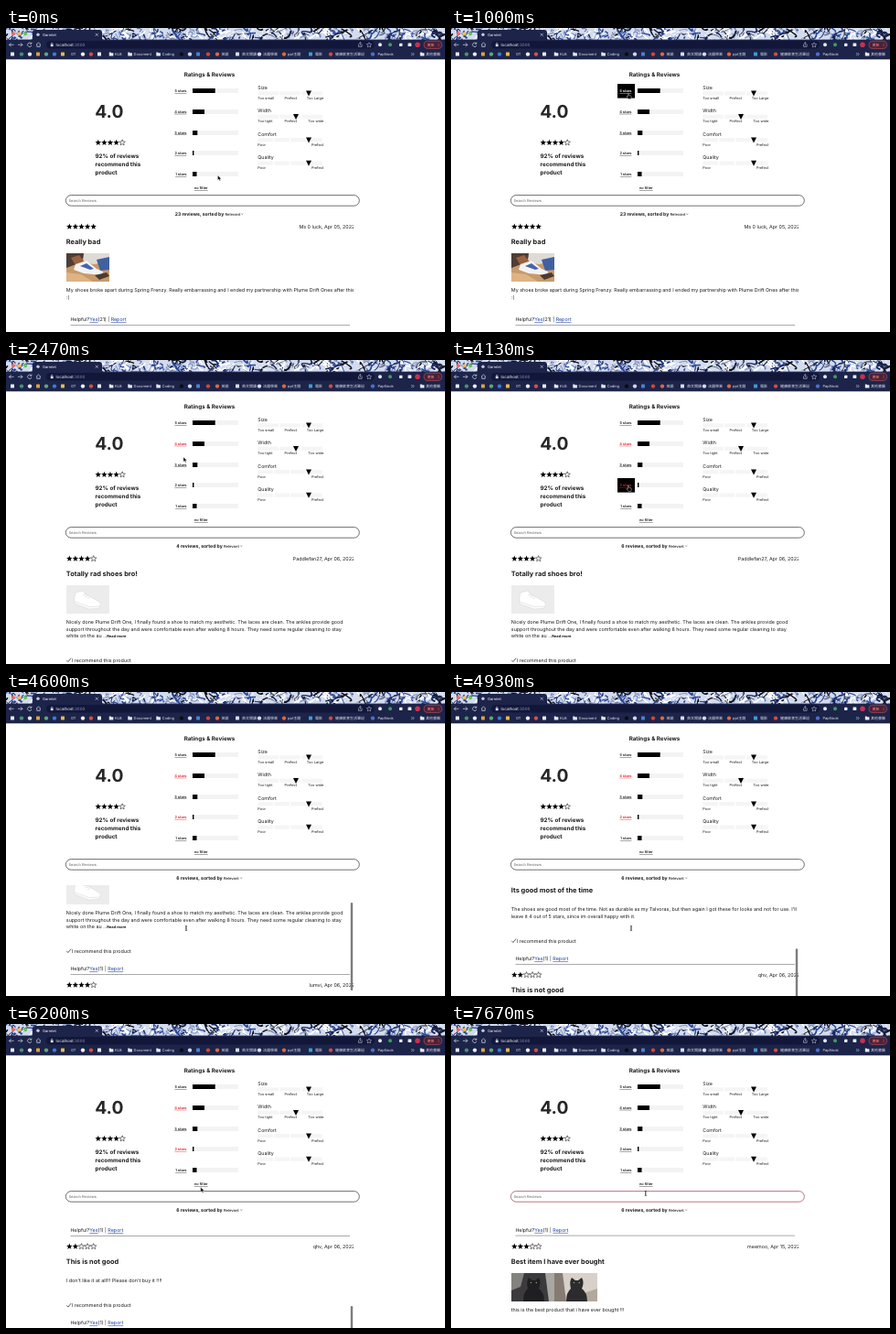
Write an HTML page that moves like this. It is 480 px wide and 332 px high and loops after 8000 ms.

```html
<!DOCTYPE html>
<html lang="en">
<head>
<meta charset="utf-8">
<title>Reviews</title>
<style>
html, body { margin: 0; width: 100%; height: 100%; overflow: hidden; background: #fff; }
svg { display: block; width: 100vw; height: 100vh; }
text { font-family: Inter, "Noto Sans CJK TC", "Noto Sans CJK", sans-serif; text-rendering: geometricPrecision; white-space: pre; }
.u { text-decoration: underline; text-decoration-thickness: .5px; }
.link { fill: #1b3fa0; text-decoration: underline; text-decoration-thickness: .45px; }
</style>
</head>
<body>
<svg id="stage" viewBox="0 0 480 332" xmlns="http://www.w3.org/2000/svg"></svg>
<script>
const NAVY = '#1d2449', INK = '#1c1c1c', BODY = 5.36;
const ROWS = [68.7, 91.4, 114.1, 136.8, 159.6];

// drawing helpers, y of text is its visual middle
const text = (x, y, s, size, o = {}) =>
  `<text x="${x}" y="${y + size * .36}" font-size="${size}" font-weight="${o.w || 400}" fill="${o.c || INK}"` +
  ` text-anchor="${o.a || 'start'}" class="${o.k || ''}" id="${o.id || ''}">${s}</text>`;
const rect = (x, y, w, h, c, extra = '') =>
  `<rect x="${x}" y="${y}" width="${w}" height="${h}" fill="${c}" ${extra}/>`;
const dot = (x, y, r, c) => `<circle cx="${x}" cy="${y}" r="${r}" fill="${c}"/>`;
const path = (d, c, w = 0, extra = '') =>
  `<path d="${d}" ${w ? `fill="none" stroke="${c}" stroke-width="${w}"` : `fill="${c}"`} ${extra}/>`;
const group = (id, s) => `<g id="${id}">${s}</g>`;

function stars(x, y, n) {
  let out = '';
  for (let i = 0; i < 5; i++) {
    const pts = [];
    for (let k = 0; k < 10; k++) {
      const r = k % 2 ? 1.45 : 3.4, a = k * Math.PI / 5;
      pts.push((x + 3.3 + i * 6.6 + r * Math.sin(a)).toFixed(2) + ' ' + (y - r * Math.cos(a)).toFixed(2));
    }
    const d = 'M' + pts.join('L') + 'Z';
    out += i < n ? path(d, '#000') : path(d, '#000', .5);
  }
  return out;
}

function rng(seed) {
  return () => (seed = (seed * 16807) % 2147483647) / 2147483647;
}

function splatter() {
  const rnd = rng(77), tones = ['#10131f', '#10131f', '#2a4796', '#2a4796', '#16265e', '#ffffff', '#ffffff', '#ffffff', '#8c9bc4'];
  let out = rect(0, 0, 480, 13, '#d3dbee');
  for (let i = 0; i < 380; i++) {
    const x = rnd() * 480, y = rnd() * 13, c = tones[Math.floor(rnd() * tones.length)];
    const p = () => `${((rnd() - .5) * 20).toFixed(1)} ${((rnd() - .5) * 18).toFixed(1)}`;
    out += path(`M${x.toFixed(1)} ${y.toFixed(1)}q${p()} ${p()}`, c, (.5 + rnd() * 1.4).toFixed(2));
  }
  return out;
}

function browser() {
  const lt = '#e6e9f5', small = { c: lt };
  let s = `<g clip-path="url(#strip)">${splatter()}</g>`;
  s += dot(8, 6.3, 2, '#ee6a5f') + dot(14.6, 6.3, 2, '#f5bd4f') + dot(21.2, 6.3, 2, '#61c454');
  s += path('M27 13q2 0 2-2v-6q0-3 3-3h70q3 0 3 3v6q0 2 2 2z', NAVY);
  s += dot(35, 7.3, 1.7, '#c3c9dc') + text(40, 7.3, 'Garmlet', 4, { c: '#fff' });
  s += path('M97.8 5.8l3 3m0-3l-3 3M109.5 7.3h4m-2-2v4', lt, .6);
  s += dot(474, 7, 3.2, NAVY) + path('M472.7 6.4l1.3 1.3 1.3-1.3', lt, .6);
  s += rect(0, 12.6, 480, 21.7, NAVY);
  s += path('M8.5 18.3h-5m2-2l-2 2 2 2M13 18.3h5m-2-2l2 2-2 2M27.6 17a2.2 2.2 0 1 0 .3 2M27.9 15.6v1.7h-1.7M33 18.2l2.5-2.2 2.5 2.2M33.8 18v2.4h3.4V18', lt, .65);
  s += rect(44, 14, 359, 8.6, '#12173a', 'rx="4.3"');
  s += rect(48.8, 17.8, 2.8, 2.4, lt) + path('M49.4 18v-1a.8.8 0 0 1 1.6 0v1', lt, .5);
  s += text(54.5, 18.4, 'localhost<tspan fill="#8c93b3">:3000</tspan>', 4.5, { c: '#fff' });
  s += path('M385.5 17.6v2.8h3.6v-2.8M387.3 19v-3.3m-1.2 1.1l1.2-1.1 1.2 1.1', lt, .5);
  s += path('M397 15.8l.8 1.7 1.9.2-1.4 1.3.4 1.9-1.7-1-1.7 1 .4-1.9-1.4-1.3 1.9-.2z', lt, .45);
  s += dot(409, 18.3, 2, '#e4e7f2') + dot(420, 18.3, 2, '#3f9d62') + rect(430, 16.7, 3.4, 3.4, lt, 'rx=".6"');
  s += rect(439.5, 16.5, 3.8, 3.6, lt, 'rx=".5"') + dot(450, 18.3, 2.8, '#c9304f');
  s += rect(457, 14.2, 19.5, 8.2, '#4a2038', 'rx="4.1" stroke="#e8655c" stroke-width=".5"');
  s += text(464.5, 18.3, '更新', 4, { c: '#ff8a80', a: 'middle' }) + path('M473 16.7v.6m0 .8v.6m0 .8v.6', '#ff8a80', .7);

  const icons = [[7, '#e6e9f5'], [17, '#4c8f72'], [26, '#e8ebf4'], [35, '#d9a13f'], [44, '#62a67c'], [53, '#3c7bd0'],
    [62, '#e5b94a'], [84, '#f0f0f0'], [93, '#d95040'], [102, '#e8ebf4'], [192, '#0b0c12'], [201, '#cfd6ea'],
    [210, '#4a80d6'], [221, '#d34635'], [231, '#e0683b'], [253, '#d8dcea'], [277, '#d8dcea'], [304, '#e0683b'],
    [333, '#3d9bd4'], [355, '#d34b3c'], [401, '#4a6fd0']];
  icons.forEach(([x, c], i) => s += i % 3 ? dot(x, 28.6, 2.2, c) : rect(x - 2, 26.6, 4, 4, c, 'rx=".5"'));
  const marks = [[71, 'GT'], [119, 'KLB'], [139.5, 'Document'], [170.5, 'Coding'], [235.5, '英語'], [258, '英文閱讀'],
    [281, '法國學業'], [308, 'ppt主題'], [338, '電影'], [360, '健康飲食生活筆記'], [406.5, 'PapNook'], [459, '其他書籤']];
  marks.forEach(([x, t]) => s += text(x, 28.6, t, 4, small));
  [115, 135.5, 166.5, 455].forEach(x => s += path(`M${x - 2.2} 26.6h1.700l.6.7h2.300v3.200h-4.600z`, lt));
  return s + path('M443 27l1.4 1.6-1.4 1.6m1.8-3.2l1.4 1.6-1.4 1.6', lt, .5);
}

function summary() {
  const b = { w: 700 };
  let s = text(222.5, 51, 'Ratings &amp; Reviews', 6.25, { w: 700, a: 'middle' });
  s += text(97.2, 91, '4.0', 19.3, { w: 700, c: '#262626' }) + stars(97.5, 125.2, 4);
  ['92% of reviews', 'recommend this', 'product'].forEach((t, i) => s += text(97.5, 139.5 + i * 8.9, t, 6.3, b));
  const fills = [24.7, 13, 5.3, 1.4, 4.5];
  s += rect(182, 0, 19, 15.6, '#000', 'id="hover"');
  ROWS.forEach((y, i) => {
    const top = Math.round(y - 2.5);
    s += text(197.4, y, `${5 - i} stars`, 3.95, { w: 600, a: 'end', k: 'u', id: 'row' + i });
    s += rect(204, top, 50, 5, '#f3f3f3') + rect(204, top, fills[i], 5, '#000');
  });
  s += text(213.3, 174.6, 'no filter', 3.95, { w: 600, a: 'middle', k: 'u' });

  const scales = [['Size', 331, 'Too small', 'Prefect', 'Too Large'], ['Width', 317, 'Too tight', 'Prefect', 'Too wide'],
    ['Comfort', 331, 'Poor', '', 'Prefect'], ['Quality', 331, 'Poor', '', 'Prefect']];
  scales.forEach(([name, x, l, m, r], i) => {
    const y = 65 + i * 25.4, n = m ? 3 : 4, w = 72 / n;
    s += text(275.3, y, name, 5.3);
    for (let k = 0; k < n; k++) s += rect(275.3 + k * w, y + 4.3, w - 1.4, 4.2, '#f5f5f5');
    s += path(`M${x - 3} ${y + 3.6}h6l-3 6z`, '#000');
    s += text(275.3, y + 11.3, l, 3.95) + text(311.3, y + 11.3, m, 3.95, { a: 'middle' }) + text(347.3, y + 11.3, r, 3.95, { a: 'end' });
  });
  s += rect(65.4, 182.6, 320.9, 11.6, '#fff', 'rx="5.8" stroke="#222" stroke-width=".65" id="search"');
  s += text(68.5, 188.5, 'Search Reviews', 4.05, { c: '#666' }) + rect(68, 186, .6, 5, '#222', 'id="caret"');
  s += text(222, 203, '', 5.1, { w: 700, a: 'middle', id: 'count' });
  return s + path('M0 0l1 .8 1-.8', '#222', .5, 'id="chev"');
}

const head = (y, n, who, title) =>
  stars(66, y, n) + text(381.2, y, who, BODY, { a: 'end' }) + text(65.8, y + 16, title, 7.4, { w: 700 });
const lines = (y, list) => list.map((t, i) => text(65.8, y + i * 7.7, t, BODY)).join('');
const helpful = (y, n) =>
  text(70.4, y, `Helpful?<tspan class="link">Yes</tspan>(${n}) | <tspan class="link">Report</tspan>`, BODY) +
  rect(70.5, y + 5.7, 305.5, .8, '#959595');
const advice = y => path(`M66.3 ${y - .2}l1.6 1.8 3.2-4`, '#222', .7) + text(71.8, y, 'I recommend this product', BODY);

function courtPhoto(x, y) {
  return `<g transform="translate(${x} ${y})">` + rect(0, 0, 47, 31, '#c79a6b') + path('M0 0h21l-5 10-16 6z', '#4f3d36') +
    path('M19 0h28v9l-17 3-12-2z', '#dedad6') + path('M33 7l14-3v14l-10 1z', '#41609f') +
    path('M5 5l9-3 8 10-9 6z', '#9a6240') + path('M10 12l12-4 11 9 7 3-1 4-20-2-11-4z', '#f4f3f2') +
    path('M15 14l7-3 8 6-4 1z', '#4465ad') + path('M0 21l16 2 13 8h-29z', '#dfb384') +
    path('M31 24l13-3 3 4-11 4z', '#4a3b33') + '</g>';
}
function shoePhoto(x, y) {
  return `<g transform="translate(${x} ${y})">` + rect(0, 0, 47, 31, '#ececec') +
    path('M10 8l8-2q2 4 7 6 8 4 12 7 1 4-1 6l-11 1-16-6q-1-6 1-12z', '#fff', 0, 'stroke="#c9c9c9" stroke-width=".4"') +
    path('M9 18l16 5.5 12-.5M18 11l4-1m-2 3l4-1.2m-1 3l3-1.3', '#cfcfcf', .5) + '</g>';
}
function petPhoto(x, y, pale) {
  const fur = pale ? '#2c2b2d' : '#1f1f22';
  const back = pale
    ? rect(0, 0, 47, 31, '#d8d1c9') + path('M0 0h9l4 31h-13z', '#857b72') + path('M32 22l15-5v14h-15z', '#b3a89d')
    : rect(0, 0, 47, 31, '#3b3b3e') + path('M0 0h14l-4 15-10 4z', '#83827f') + path('M37 0h10v31h-6z', '#a9a7a2');
  return `<g transform="translate(${x} ${y})">` + back +
    path('M13 31q0-10 5-14-2-8 1-12l4 3h3l4-3q3 5 0 12 6 4 6 14z', fur) +
    dot(21.5, 10.5, .7, '#a9a27c') + dot(27.3, 10.5, .7, '#a9a27c') + '</g>';
}

const listA = head(217, 5, 'Ms 0 luck, Apr 05, 2022', 'Really bad') + courtPhoto(66, 246) +
  lines(286, ['My shoes broke apart during Spring Frenzy. Really embarrassing and I ended my partnership with Plume Drift Ones after this', ':(']) +
  helpful(318.3, 21);
const listB = head(217, 4, 'Paddlefan27, Apr 06, 2022', 'Totally rad shoes bro!') + shoePhoto(66, 246) +
  lines(286, ['Nicely done Plume Drift One, I finally found a shoe to match my aesthetic. The laces are clean. The ankles provide good',
    'support throughout the day and were comfortable even after walking 8 hours. They need some regular cleaning to stay',
    'white on the au <tspan font-size="4.1" font-weight="700">...Read more</tspan>']) + advice(328) + helpful(347.3, 1) +
  head(365, 4, 'lumvi, Apr 06, 2022', 'Its good most of the time') +
  lines(402.3, ["The shoes are good most of the time. Not as durable as my Talvoras, but then again I got these for looks and not for use. I'll",
    'leave it 4 out of 5 stars, since im overall happy with it.']) + advice(437) + helpful(456.3, 1) +
  head(474, 2, 'qhv, Apr 06, 2022', 'This is not good') +
  lines(511.3, ["I don't like it at all!!! Please don't buy it !!!!"]) + advice(538.5) + helpful(557.3, 1);
const listC = helpful(225, 1) + head(243, 3, 'meemoo, Apr 15, 2022', 'Best item I have ever bought') +
  petPhoto(66, 272, false) + petPhoto(113, 272, true) + lines(312, ['this is the best product that i have ever bought !!!']);

const cursor =
  group('arrow', path('M0 0v5.2l1.3-1.1.9 2 .9-.4-.9-1.9h1.7z', '#000', 0, 'stroke="#fff" stroke-width=".35"')) +
  group('hand', path('M-.6.3q.6-.6 1.2 0v2l2.2.6q.7.3.5 1.2l-.5 2.2h-2.9l-1.9-2.5q.2-.9 1.4-.1z', '#000', 0, 'stroke="#fff" stroke-width=".4"')) +
  group('beam', path('M-1.1-2.7q1.1 0 1.1.7v4q0 .7-1.1.7M1.1-2.7q-1.1 0-1.1.7v4q0 .7 1.1.7', '#222', .6));

document.getElementById('stage').innerHTML =
  '<defs><clipPath id="strip"><rect width="480" height="13"/></clipPath>' +
  '<clipPath id="view"><rect x="65" y="211" width="315" height="121"/></clipPath></defs>' +
  rect(0, 0, 480, 332, '#fff') + browser() + summary() +
  `<g clip-path="url(#view)">${group('A', listA) + group('B', listB) + group('C', listC)}` +
  rect(376.8, 0, 2.4, 96, '#7c7c7c', 'rx="1.2" id="thumb"') + '</g>' + group('cursor', cursor);

const $ = id => document.getElementById(id);
const show = (id, on) => { $(id).style.display = on ? '' : 'none'; };
const set = (id, key, v) => $(id).setAttribute(key, v);

// time, x, y
const MOVES = [[0, 231.5, 161], [730, 194, 69.8], [870, 194, 69.8], [1670, 193, 89], [2130, 193, 90], [2470, 194, 106],
  [3130, 194, 137], [4130, 194, 137], [4330, 197, 258], [5800, 197, 258], [6200, 212.8, 178.3], [6330, 212.8, 174.5],
  [6670, 212.8, 174.5], [7200, 212.8, 185]];
const SCROLL = [[4400, 0], [4600, 45], [4933, 165], [5267, 210], [5733, 231]];
const COUNTS = ['23 reviews, sorted by', '4 reviews, sorted by', '6 reviews, sorted by'];

function at(keys, t, col, ease = u => u) {
  const i = keys.findIndex(k => k[0] > t);
  if (i < 0) return keys[keys.length - 1][col];
  if (i === 0) return keys[0][col];
  const a = keys[i - 1], b = keys[i];
  return a[col] + (b[col] - a[col]) * ease((t - a[0]) / (b[0] - a[0]));
}
const smooth = u => u * u * (3 - 2 * u);

let shown = '';
function draw(t) {
  const x = at(MOVES, t, 1, smooth), y = at(MOVES, t, 2, smooth), top = at(SCROLL, t, 1);
  const four = t > 1860, two = t > 3660, clear = t > 6460;

  const over = Math.abs(x - 191.5) < 9.5 ? ROWS.findIndex(r => Math.abs(y - r) < 7.6) : -1;
  show('hover', over >= 0);
  if (over >= 0) set('hover', 'y', Math.round(ROWS[over] - 7.8));
  ROWS.forEach((r, i) => {
    const on = !clear && (i === 1 && four || i === 3 && two);
    set('row' + i, 'fill', on ? '#e0202c' : i === over ? '#fff' : INK);
  });

  const label = COUNTS[two ? 2 : four ? 1 : 0];
  if (label !== shown) {
    shown = label;
    $('count').innerHTML = `${label} <tspan font-size="4.1" font-weight="500">Relevant</tspan><tspan font-size="4.1">   </tspan>`;
  }
  set('chev', 'transform', `translate(${four ? 256.3 : 257.3} 202.8)`);

  show('A', !four);
  show('B', four && !clear);
  show('C', clear);
  set('B', 'transform', `translate(0 ${-top})`);
  set('thumb', 'y', 211 + top * .42);
  set('thumb', 'opacity', t < 4460 ? 0 : Math.max(0, Math.min(1, (6660 - t) / 200)));

  const inSearch = y > 182.8 && y < 194;
  set('search', 'stroke', inSearch ? '#8e2f3d' : '#222');
  show('caret', t > 7190 && t < 7660);

  const link = over >= 0 || Math.abs(x - 213) < 8 && Math.abs(y - 174.6) < 2.8;
  const beam = inSearch || y > 211;
  set('cursor', 'transform', `translate(${x} ${y})`);
  show('hand', link);
  show('beam', beam);
  show('arrow', !link && !beam);
}

const STEP = 200 / 3, start = performance.now();
function tick() {
  const t = (performance.now() - start) % 8000;
  draw(Math.floor((t + 4) / STEP) * STEP);
  requestAnimationFrame(tick);
}
tick();
</script>
</body>
</html>
```
